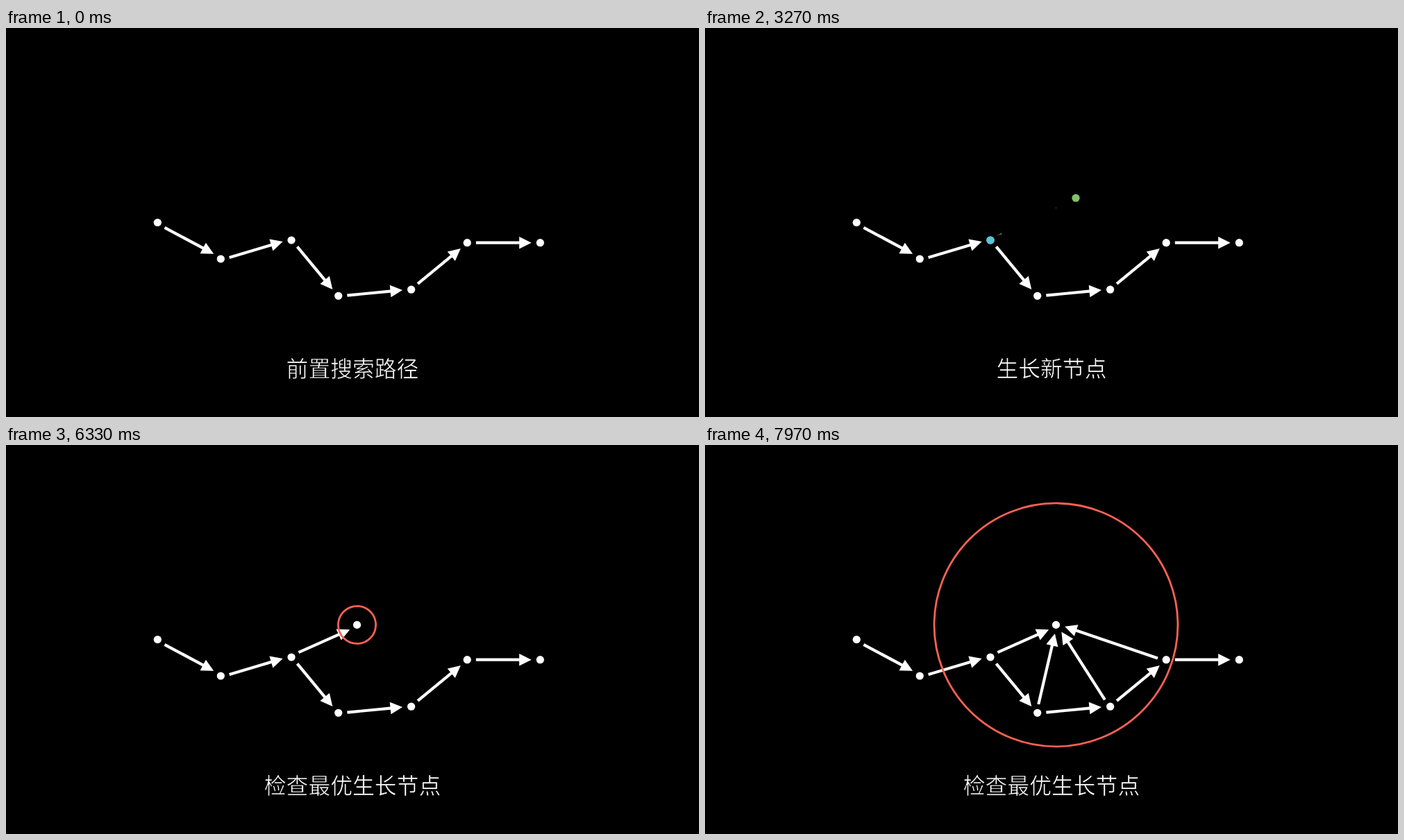
These frames come from a looping animation (998 px wide and 561 px high, 8 s). An HTML page:

```html
<!DOCTYPE html>
<html lang="zh-CN">
<head>
<meta charset="utf-8">
<title>生长新节点</title>
<style>
  html, body { margin: 0; width: 100%; height: 100%; overflow: hidden; background: #000; }
  svg { display: block; width: 100vw; height: 100vh; }
  text {
    font: 300 31.8px "Noto Sans CJK SC", "Noto Sans CJK", sans-serif;
    text-anchor: middle;
    fill: #fff;
    stroke: #000; /* thins the strokes of the glyphs */
    stroke-width: 0.6px;
  }
</style>
</head>
<body>
<svg id="stage" viewBox="0 0 998 561"></svg>
<script>
const stage = document.getElementById("stage");
const LOOP = 8000, FPS = 30, UNIT = 998 * 9 / 16 / 8;
const DOT = 0.08 * UNIT, GAP = 0.1 * UNIT, TIP = 0.25 * UNIT, SHAFT = 0.06 * UNIT;
const RADIUS = 2.5 * UNIT;

const path = [[218.3, 280.5], [309.3, 333], [411, 306], [478.7, 386.3], [583.6, 377.2], [664.2, 309.7], [769.3, 309.7]];
const fresh = [505.5, 259.4], sample = [534, 245.2];

function add(tag, attrs, parent = stage) {
  const el = document.createElementNS("http://www.w3.org/2000/svg", tag);
  for (const k in attrs) el.setAttribute(k, attrs[k]);
  return parent.appendChild(el);
}

// Each shape sits at its own origin, so it can grow by scaling.
function dot([x, y], fill = "#fff") {
  const g = add("g", { transform: `translate(${x} ${y})` });
  return add("circle", { r: DOT, fill }, g);
}

// Arrows join the dots at the rim point nearest in steps of 45 degrees.
function arrow([x1, y1], [x2, y2]) {
  const step = Math.PI / 4;
  const aim = Math.round(Math.atan2(y2 - y1, x2 - x1) / step) * step;
  const rx = DOT * Math.cos(aim), ry = DOT * Math.sin(aim);
  const dx = x2 - x1 - 2 * rx, dy = y2 - y1 - 2 * ry, dist = Math.hypot(dx, dy);
  const len = dist - 2 * GAP, neck = len - TIP, w = SHAFT / 2;
  const turn = Math.atan2(dy, dx) * 180 / Math.PI;
  const g = add("g", {
    transform: `translate(${x1 + rx + dx / dist * GAP} ${y1 + ry + dy / dist * GAP}) rotate(${turn})`
  });
  return add("path", {
    fill: "#fff",
    d: `M0 ${-w}H${neck}V${-TIP / 2}L${len} 0L${neck} ${TIP / 2}V${w}H0Z`
  }, g);
}

function caption(str) {
  const el = add("text", { x: 499, y: 503.3 });
  el.textContent = str;
  return el;
}

path.forEach(p => dot(p));
path.slice(1).forEach((p, i) => arrow(path[i], p));

const near = dot(path[2], "#58c4dd");
const target = dot(sample, "#83c167");
const branch = [arrow(path[2], fresh), dot(fresh)];
const links = [3, 4, 5].map(i => arrow(path[i], fresh));
const ring = add("circle", { cx: fresh[0], cy: fresh[1], fill: "none", stroke: "#fc6255", "stroke-width": 0.04 * UNIT });
const captions = ["前置搜索路径", "生长新节点", "检查最优生长节点"].map(caption);

const sigmoid = x => 1 / (1 + Math.exp(-x));
const edge = sigmoid(-5);

// Smooth 0 to 1 over the second that begins at start.
function ease(t, start) {
  const u = Math.min(1, Math.max(0, (t - start) / 1000));
  return (sigmoid(10 * (u - 0.5)) - edge) / (1 - 2 * edge);
}

const fade = (el, a) => el.setAttribute("opacity", Math.max(0, a));
const grow = (el, s) => {
  el.setAttribute("transform", `scale(${s})`);
  el.style.visibility = s > 0.001 ? "visible" : "hidden";
};

function draw(t) {
  const second = ease(t, 1000), third = ease(t, 5000);
  fade(captions[0], 1 - second);
  fade(captions[1], second - third);
  fade(captions[2], third);

  const seen = ease(t, 2000), gone = ease(t, 4000);
  grow(target, seen);
  fade(target, 1 - gone);
  fade(near, seen - gone);

  branch.forEach(el => grow(el, ease(t, 3000)));

  const r = RADIUS * ease(t, 6000);
  ring.setAttribute("r", r);
  ring.style.visibility = r > 0.1 ? "visible" : "hidden";

  links.forEach(el => grow(el, ease(t, 7000)));
}

// Hold each picture for one frame; delays are rounded to 10 ms.
const snap = t => Math.floor((t + 5) * FPS / 1000) * 1000 / FPS;

const begin = performance.now();
function tick() {
  draw(snap((performance.now() - begin) % LOOP));
  requestAnimationFrame(tick);
}
tick();
</script>
</body>
</html>
```
